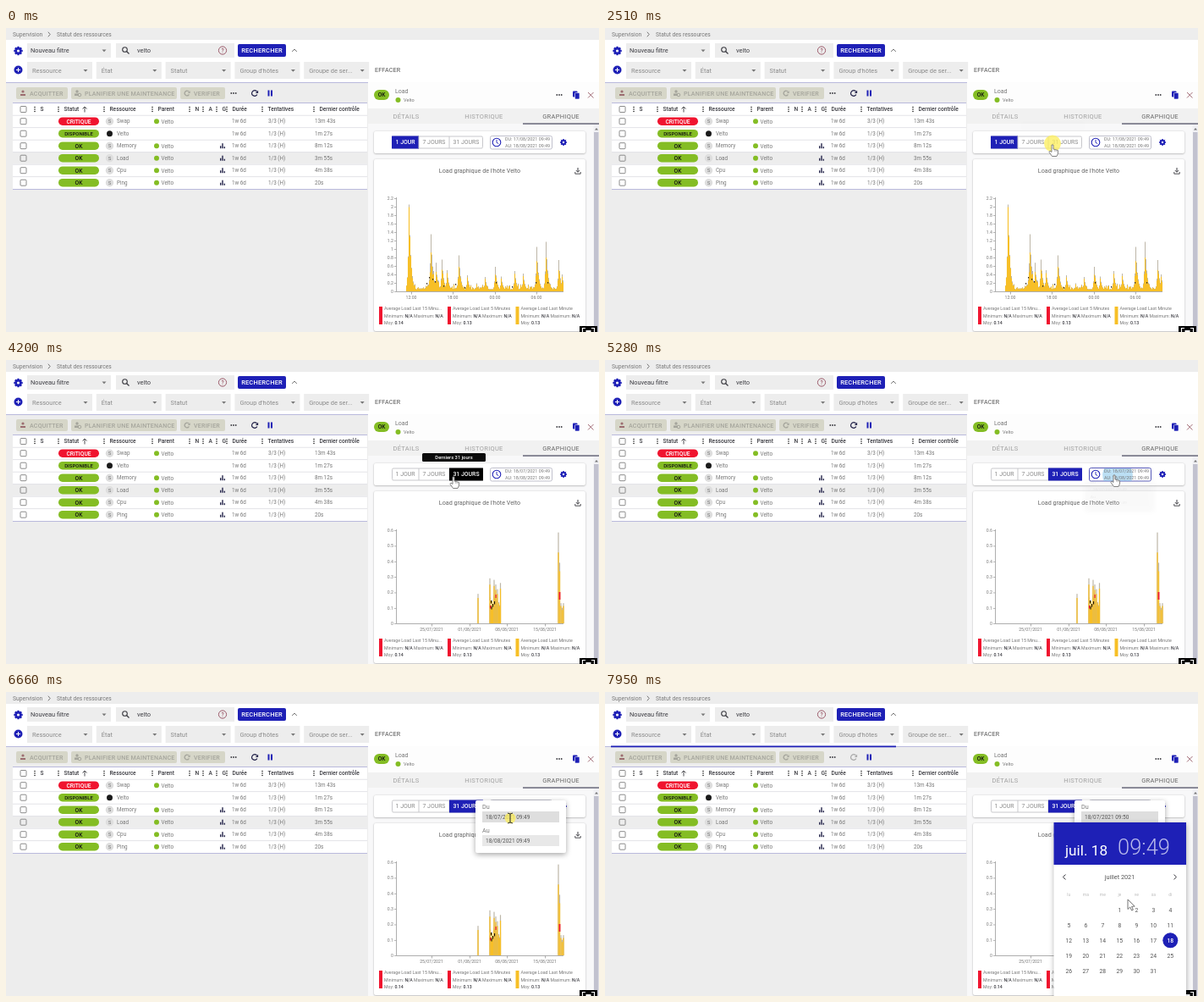
Recreate the animation shown at these times as an HTML page with a canvas. Size 701x359 px, loop 8000 ms.

```html
<!DOCTYPE html>
<html lang="fr">
<head>
<meta charset="utf-8">
<title>Statut des ressources</title>
<style>
html, body { margin: 0; width: 100%; height: 100%; overflow: hidden; background: #ededed; }
canvas { display: block; width: 701px; height: 359px; }
</style>
</head>
<body>
<canvas id="stage" width="701" height="359"></canvas>
<script>
const c = document.getElementById('stage').getContext('2d');
const LOOP = 8000;
const HOST = 'Velto';
const BLUE = '#1e20b6', GREEN = '#84bd24', RED = '#f0142f', YELLOW = '#f7bf27';
const INK = '#3a3a40', GREY = '#777', SOFT = '#8a8a8a', PALE = '#ededed', NAVY = '#24244a';

const clamp = v => Math.max(0, Math.min(1, v));
const ramp = (t, a, b) => clamp((t - a) / (b - a));
const smooth = v => v * v * (3 - 2 * v);
const noise = n => { const s = Math.sin(n * 127.1 + 3.7) * 43758.5453; return s - Math.floor(s); };

function rect(x, y, w, h, fill) { c.fillStyle = fill; c.fillRect(x, y, w, h); }

function box(x, y, w, h, r, fill, stroke, line = 1) {
  c.beginPath();
  c.roundRect(x, y, w, h, r);
  if (fill) { c.fillStyle = fill; c.fill(); }
  if (stroke) { c.strokeStyle = stroke; c.lineWidth = line; c.stroke(); }
}

function dot(x, y, r, fill) {
  c.beginPath();
  c.arc(x, y, r, 0, 7);
  c.fillStyle = fill;
  c.fill();
}

function ring(x, y, r, color, line = 1, from = 0, to = Math.PI * 2) {
  c.beginPath();
  c.arc(x, y, r, from, to);
  c.strokeStyle = color;
  c.lineWidth = line;
  c.stroke();
}

function path(points, color, line = 1, fill) {
  c.beginPath();
  points.forEach(([x, y], i) => i ? c.lineTo(x, y) : c.moveTo(x, y));
  if (fill) { c.closePath(); c.fillStyle = fill; c.fill(); }
  if (color) { c.strokeStyle = color; c.lineWidth = line; c.stroke(); }
}

// y is the middle of the capital letters; returns the width
function text(s, x, y, size, color = INK, { weight = 400, align = 'left', space = 0 } = {}) {
  c.font = `${weight} ${size}px Roboto, Arial, sans-serif`;
  c.letterSpacing = space + 'px';
  c.textAlign = align;
  c.fillStyle = color;
  c.fillText(s, x, y + size * 0.36);
  return c.measureText(s).width;
}

function shadowed(draw, blur = 6, drop = 2) {
  c.save();
  c.shadowColor = 'rgba(0,0,0,.35)';
  c.shadowBlur = blur;
  c.shadowOffsetY = drop;
  draw();
  c.restore();
}

function gear(x, y, r) {
  c.save();
  c.translate(x, y);
  for (let i = 0; i < 8; i++) {
    c.rotate(Math.PI / 4);
    rect(-r * 0.22, -r, r * 0.44, r, BLUE);
  }
  c.restore();
  ring(x, y, r * 0.55, BLUE, r * 0.5);
  dot(x, y, r * 0.3, '#fff');
}

function dots(x, y, dx, dy, r, color) {
  for (const k of [-1, 0, 1]) dot(x + k * dx, y + k * dy, r, color);
}

function chevron(x, y, dx, dy, color = GREY) {
  path(dx ? [[x - dx, y - 2.8], [x + dx, y], [x - dx, y + 2.8]]
          : [[x - 2.8, y + dy], [x, y - dy], [x + 2.8, y + dy]], color, 1);
}

function reload(x, y, r, color) {
  ring(x, y, r, color, 1.2, 0.5, 5.6);
  path([[x + r + 0.8, y - r], [x + r + 0.8, y], [x + 0.8, y]], null, 0, color);
}

function select(label, x, y, w, h, color = SOFT, inset = 6) {
  rect(x, y, w, h, PALE);
  text(label, x + inset, y + h / 2, 7.4, color);
  const mx = x + w - 8, my = y + h / 2;
  path([[mx - 2.5, my - 1], [mx + 2.5, my - 1], [mx, my + 1.8]], null, 0, GREY);
}

function filters() {
  rect(0, 0, 701, 359, PALE);
  text('Supervision', 8, 7.5, 6.8, GREY);
  chevron(51, 7.5, 1.2, 0);
  text('Statut des ressources', 60, 7.5, 6.7, GREY);

  rect(0, 14, 701, 50, '#fff');
  gear(14.5, 27, 5.2);
  select('Nouveau filtre', 25, 18, 99, 17, INK, 4);
  rect(130, 18, 140, 17, PALE);
  ring(140.5, 25.5, 2.8, INK, 1.1);
  path([[142.5, 27.5], [145.5, 30.5]], INK, 1.3);
  text(HOST.toLowerCase(), 155, 26.5, 7.5);
  ring(256, 26.5, 4.6, '#9c5a6a', 1);
  text('?', 256, 26.7, 6.5, '#9c5a6a', { weight: 500, align: 'center' });
  box(274, 19, 57, 15, 2, BLUE);
  text('RECHERCHER', 302.5, 26.7, 7.5, '#fff', { weight: 500, align: 'center', space: 0.15 });
  chevron(341, 26.5, 0, 1.5, GREY);

  dot(14.5, 49.5, 5, BLUE);
  rect(12, 49, 5, 1, '#fff');
  rect(14, 47, 1, 5, '#fff');
  ['Ressource', 'État', 'Statut', "Group d'hôtes", 'Groupe de ser...']
    .forEach((s, i) => select(s, 25 + i * 81.8, 40, 77, 20));
  text('EFFACER', 436, 49.5, 7.1, '#555', { space: 0.2 });
}

function toolbar(t) {
  rect(0, 64, 428, 1, '#b9b9dc');
  const bar = ramp(t, 7500, 7950);
  if (bar) rect(7, 63.5, 337 * bar, 1.8, BLUE);
  const off = '#a5a59c';
  for (const [x, w, s] of [[12, 61, 'ACQUITTER'], [77, 125, 'PLANIFIER UNE MAINTENANCE'], [206, 53, 'VERIFIER']]) {
    box(x, 70, w, 14, 2, '#d6d6c8');
    text(s, x + 16, 77.2, 7.1, off, { weight: 500, space: 0.2 });
  }
  dot(20, 75, 1.6, '#9c6d70');
  rect(17, 78, 6, 2, '#9c6d70');
  dot(84, 75, 1.7, off);
  rect(81, 77.5, 5, 2.5, off);
  ring(87, 79, 1.8, off);
  reload(214, 77, 2.8, off);
  dots(269, 77, 2.7, 0, 0.9, INK);
  reload(294, 77, 3.3, t >= 7500 ? '#aaa' : NAVY);
  rect(309.5, 73.5, 2, 7, BLUE);
  rect(313, 73.5, 2, 7, BLUE);
}

const COLS = [[34, 'S'], [62, 'Statut'], [116, 'Ressource'], [173, 'Parent'], [217, 'N'],
  [233, 'A'], [249, 'G'], [261, 'Durée'], [303, 'Tentatives'], [364, 'Dernier contrôle']];
const ROWS = [['CRITIQUE', 'Swap', '3/3 (H)', '13m 43s'], ['DISPONIBLE', HOST, '1/3 (H)', '1m 27s'],
  ['OK', 'Memory', '1/3 (H)', '8m 12s'], ['OK', 'Load', '1/3 (H)', '3m 55s'],
  ['OK', 'Cpu', '1/3 (H)', '4m 38s'], ['OK', 'Ping', '1/3 (H)', '20s']];

function checkbox(y) { box(17, y - 3.5, 7, 7, 1, null, SOFT, 1); }

function table() {
  rect(8, 88, 419, 102, '#fff');
  rect(8, 88, 419, 1, '#b9b9dc');
  checkbox(96);
  for (const [x, s] of COLS) {
    dots(x, 96, 0, 2.5, 0.8, '#222');
    text(s, x + 6.5, 96, 6.6, INK, { weight: 500 });
  }
  path([[93, 99.5], [93, 93]], INK, 0.9);
  path([[90.5, 95.5], [93, 93], [95.5, 95.5]], INK, 0.9);

  ROWS.forEach(([status, name, tries, last], i) => {
    const y = 110.2 + i * 14.5;
    if (i === 3) rect(8, y - 7, 419, 14, PALE);
    rect(8, y - 7.4, 419, 0.8, '#dcdce2');
    checkbox(y);
    box(62, y - 4.8, 48, 9.6, 4.8, i ? GREEN : RED);
    text(status, 86, y, i === 1 ? 6 : 6.7, i ? '#111' : '#fff', { weight: 500, align: 'center' });
    if (i === 1) {
      dot(122.5, y, 3.5, '#1a1a1a');
    } else {
      dot(122.5, y, 4.7, '#dedede');
      text('S', 122.5, y, 6, GREY, { align: 'center' });
      dot(178, y, 3, GREEN);
      text(HOST, 183.5, y, 6.4, GREY);
    }
    if (i > 1) [3, 6, 2].forEach((h, k) => rect(253 + k * 2.3, y + 3 - h, 1.4, h, NAVY));
    text(name, 131, y, 6.3, GREY);
    text('1w 6d', 267, y, 6.3, GREY);
    text(tries, 310, y, 6.3, GREY);
    text(last, 365, y, 6.3, GREY);
  });
  rect(8, 190, 419, 1, '#b9b9dc');
}

function panel() {
  rect(428, 64, 273, 295, '#f8f8f9');
  rect(428, 64, 273, 31, '#fdfdfd');
  rect(428, 95, 273, 18, '#f1f1f1');
  box(435, 73, 18, 12, 6, GREEN);
  text('OK', 444, 79, 6.5, '#111', { weight: 500, align: 'center' });
  text('Load', 460, 74.5, 7, GREY);
  dot(463.5, 85, 3, GREEN);
  text(HOST, 470, 85, 5.6, GREY);
  dots(654, 79, 2.7, 0, 0.9, INK);
  box(670, 74.5, 5.5, 7, 1, BLUE);
  box(672.5, 76.5, 5.5, 7.5, 1, BLUE, '#fdfdfd', 0.6);
  path([[688, 76], [694.5, 82.5]], '#985d68', 0.9);
  path([[694.5, 76], [688, 82.5]], '#985d68', 0.9);
  const tab = { align: 'center', space: 0.3 };
  text('DÉTAILS', 473, 104, 7.5, '#a0a0a0', tab);
  text('HISTORIQUE', 565, 104, 7.5, '#a0a0a0', tab);
  text('GRAPHIQUE', 656, 104, 7.5, '#666', tab);
  rect(611, 112.5, 90, 1.1, '#34344c');

  rect(694.5, 114, 6.5, 245, '#f0f0f4');
  rect(695, 123, 5.5, 236, '#c2c2cf');
  path([[696, 120.5], [700, 120.5], [698, 118]], null, 0, '#777');
  shadowed(() => box(435, 122, 250, 26, 2, '#fff'), 2, 0.4);
  shadowed(() => box(435, 155, 250, 203, 2, '#fff'), 2, 0.4);
}

function periods(t, pos) {
  const chosen = t < 2620 ? 0 : 2;
  const over = (x, w) => pos && pos.x >= x && pos.x < x + w && pos.y > 126 && pos.y < 143;
  box(456.5, 128, 107, 14, 1.5, '#fff', '#c8c8cc', 1);
  [[456, 32, '1 JOUR'], [488, 36, '7 JOURS'], [524, 40, '31 JOURS']].forEach(([x, w, s], i) => {
    const on = chosen === i;
    if (i) rect(x - 0.5, 128, 1, 14, '#c8c8cc');
    if (on) rect(x, 127.5, w, 15, over(x, w) ? '#000' : BLUE);
    text(s, x + w / 2, 135, 6.9, on ? '#fff' : SOFT, { align: 'center', weight: on ? 500 : 400 });
  });

  const day = chosen ? '18/07/2021' : '17/08/2021';
  box(572.5, 127.5, 73, 15.5, 2, '#fff', over(572, 74) ? '#5558b8' : '#c0c0cc', 1);
  const wave = ramp(t, 5150, 5350);
  if (wave && t < 5600) {
    c.save();
    c.beginPath();
    c.rect(573, 128, 72, 15);
    c.clip();
    dot(606, 136, 22 * Math.sqrt(wave), 'rgba(105,185,230,.45)');
    c.restore();
  }
  ring(580, 135, 4.8, BLUE, 1.1);
  path([[580, 132], [580, 135.3], [582.3, 136.6]], BLUE, 0.9);
  text(`DU: ${day} 09:49`, 590, 131, 5.4, GREY);
  text('AU: 18/08/2021 09:49', 590, 138.8, 5.4, GREY);
  gear(659, 135, 3.9);
}

function axes(top, step, unit, ticks) {
  path([[461.5, 200], [461.5, 311.5], [659, 311.5]], '#9a9a9a', 0.8);
  for (let i = 0; i * step <= top + 0.01; i++) {
    const y = 311.3 - i * step * unit;
    rect(459, y, 2.5, 0.7, '#999');
    text(String(+(i * step).toFixed(1)), 458, y, 5.2, GREY, { align: 'right' });
  }
  for (const [x, s] of ticks) {
    rect(x, 311.5, 0.8, 3, '#999');
    text(s, x, 318.5, 5.2, GREY, { align: 'center' });
  }
}

function spike(x, value, unit, width, share) {
  const h = value * unit;
  rect(x - width * 0.5, 311 - h, width, h, '#bdb6a8');
  rect(x - width * 0.55, 311 - h * share, width * 1.1, h * share, YELLOW);
}

const PEAKS = [[476, 2.05], [502, 1.3], [508, 0.6], [515, 0.75], [521, 0.5], [535, 0.85], [545, 0.38],
  [566, 0.34], [578, 0.58], [585, 0.35], [601, 0.48], [611, 0.42], [627, 1.05], [638, 1.17], [653, 0.74], [657, 0.4]];

function dayChart() {
  axes(2.2, 0.2, 50, [[479, '12:00'], [528, '18:00'], [578, '00:00'], [627, '06:00']]);
  for (let x = 473; x < 659; x++) {
    let v = 0.05 + 0.16 * noise(x) * noise(x * 0.37);
    for (const [p, h] of PEAKS) v = Math.max(v, h * Math.exp(-Math.abs(x - p) / (x < p ? 1.1 : 2.3)));
    if (x > 496 && x < 512) v += 0.14 * noise(x + 9);
    spike(x + 0.5, v, 50, 1, x < 480 ? 0.97 : v > 0.5 ? 0.68 : 0.86);
  }
  for (const [x, y] of [[497, 301], [500, 294], [504, 296], [507, 299], [517, 304], [531, 302], [542, 306],
    [579, 300], [598, 305], [626, 300], [640, 300]]) rect(x, y, 1.2, 1.6, '#302820');
}

function monthChart() {
  axes(0.6, 0.1, 183.5, [[503, '25/07/2021'], [548, '01/08/2021'], [592, '08/08/2021'], [637, '15/08/2021']]);
  const unit = 183.5;
  for (let x = 572; x < 585; x++) spike(x + 0.5, 0.11 + 0.09 * noise(x), unit, 1, 0.94);
  for (const [x, v] of [[558, 0.19], [572, 0.29], [577, 0.28], [579, 0.25], [581, 0.22], [584.5, 0.26],
    [653, 0.585], [654.5, 0.39], [656, 0.13], [657.5, 0.1], [659, 0.13]]) {
    spike(x, v, unit, 1.2, v > 0.5 ? 0.78 : 0.86);
  }
  rect(572, 290, 1.4, 3.5, RED);
  rect(578.5, 277, 1.2, 4, RED);
  rect(653.6, 274, 1.8, 9, RED);
  for (const [x, y] of [[573, 284], [575, 288], [577, 285], [573.5, 291]]) rect(x, y, 1.1, 3.5, '#1c1810');
}

function pairs(x, y, ...items) {
  for (const [label, value] of items) {
    x += text(label + ': ', x, y, 5.2, GREY);
    x += text(value + ' ', x, y, 5.2, INK, { weight: 500 });
  }
}

function graph(t) {
  text("Load graphique de l'hôte " + HOST, 560, 168.5, 7.2, '#666', { align: 'center' });
  path([[676, 165], [676, 170]], INK, 1);
  path([[673.8, 168], [676, 170.3], [678.2, 168]], INK, 0.9);
  path([[672.8, 170], [672.8, 172.2], [679.2, 172.2], [679.2, 170]], INK, 0.9);
  if (t < 3100) dayChart(); else monthChart();
  [[441, RED, '15 Minu...', '0.14'], [522, RED, '5 Minutes', '0.13'], [602.5, YELLOW, 'Minute', '0.13']]
    .forEach(([x, color, span, mean]) => {
      rect(x, 329, 4, 21, color);
      text('Average Load Last ' + span, x + 6, 331.5, 5.3, GREY);
      pairs(x + 6, 340, ['Minimum', 'N/A'], ['Maximum', 'N/A']);
      pairs(x + 6, 348, ['Moy', mean]);
    });
}

function corner() {
  rect(678, 352, 21, 7, '#000');
  path([[681.5, 359], [681.5, 354.5], [685, 354.5]], '#fff', 1.2);
  path([[692, 354.5], [695.5, 354.5], [695.5, 359]], '#fff', 1.2);
  rect(685.5, 357, 6, 2, '#fff');
}

function tooltip(t) {
  const a = ramp(t, 2510, 2750) * (1 - ramp(t, 4680, 4850));
  if (!a) return;
  c.globalAlpha = a;
  box(492, 110, 75, 10, 1.5, '#0c0c0c');
  text('Derniers 31 jours', 529.5, 115, 5.8, '#fff', { weight: 500, align: 'center' });
  c.globalAlpha = 1;
}

function grow(p, x, y, draw) {
  if (!p) return;
  const s = smooth(p);
  c.save();
  c.globalAlpha = s;
  c.translate(x, y);
  c.scale(0.75 + 0.25 * s, 0.56 + 0.44 * s);
  c.translate(-x, -y);
  draw();
  c.restore();
}

function rangePopup(t) {
  grow(ramp(t, 5240, 5480), 608, 159, () => {
    shadowed(() => box(555, 128, 107, 62, 2, '#fff'));
    text('Du', 563, 135.3, 7.2, GREY);
    rect(563, 141, 91, 13, t > 6000 ? '#dedede' : '#e8e8e8');
    text(t < 7500 ? '18/07/2021 09:49' : '18/07/2021 09:50', 567, 147.8, 6.5, '#555');
    text('Au', 563, 163.3, 7.2, GREY);
    rect(563, 169, 91, 13, '#e8e8e8');
    text('18/08/2021 09:49', 567, 175.8, 6.5, '#555');
  });
}

function calendar(t) {
  grow(ramp(t, 6690, 6960), 608, 260, () => {
    shadowed(() => rect(530.5, 154, 156.5, 220, '#fff'));
    rect(530.5, 154, 156.5, 50, BLUE);
    text('juil. 18', 544, 186.5, 17.2, '#fff');
    text('09:49', 606, 182.5, 25.5, '#b9baeb', { weight: 300 });
    text('juillet 2021', 608.5, 218, 7.3, '#555', { align: 'center' });
    path([[544.5, 215.5], [541.5, 218.5], [544.5, 221.5]], INK, 1);
    chevron(674, 218.5, 1.5, 0, INK);
    ['lu', 'ma', 'me', 'je', 've', 'sa', 'di'].forEach((s, i) =>
      text(s, 548.3 + i * 20, 239, 5, '#bbb', { align: 'center' }));
    for (let d = 1; d <= 31; d++) {
      const k = d + 2, x = 548.3 + (k % 7) * 20, y = 257.3 + Math.floor(k / 7) * 18;
      if (d === 18) dot(x, y, 9, BLUE);
      text(String(d), x, y, 6.8, d === 18 ? '#fff' : '#555', { align: 'center', weight: d === 18 ? 500 : 400 });
    }
  });
}

// time, hot spot x, hot spot y, shape from then on
const TRACK = [[800, 703, 358, 'arrow'], [1200, 630, 212, 'arrow'], [1300, 607, 176, 'beam'],
  [1350, 602, 169, 'beam'], [1420, 588, 145, 'hand'], [1550, 549, 137, 'hand'], [1620, 546, 138, 'hand'],
  [1820, 514, 152, 'arrow'], [2000, 494, 148, 'arrow'], [2120, 499, 139, 'hand'], [2370, 529, 138, 'hand'],
  [4600, 529, 138, 'hand'], [4900, 560, 138, 'hand'], [5250, 602, 136, 'hand'], [5680, 602, 136, 'arrow'],
  [6000, 614, 158, 'arrow'], [6220, 606, 153, 'beam'], [6460, 596, 149, 'beam'], [6800, 596, 149, 'beam'],
  [6960, 600, 168, 'arrow'], [7260, 613, 226, 'arrow'], [7460, 613, 226, 'arrow'], [7800, 618, 245, 'arrow'],
  [8000, 618, 245, 'arrow']];

function pointer(t) {
  if (t < TRACK[0][0]) return null;
  const i = TRACK.findIndex(k => k[0] > t);
  const [a, x, y, shape] = TRACK[i - 1], [b, x2, y2] = TRACK[i];
  const p = ramp(t, a, b);
  return { x: x + (x2 - x) * p, y: y + (y2 - y) * p, shape };
}

function drawPointer({ x, y, shape }) {
  c.save();
  c.translate(x, y);
  if (shape === 'beam') {
    path([[-3, -6], [0, -5], [3, -6]], '#333', 1);
    path([[0, -5], [0, 5]], '#333', 1.1);
    path([[-3, 6], [0, 5], [3, 6]], '#333', 1);
  } else if (shape === 'hand') {
    path([[-1, 0], [1, 0], [1, 5], [6.5, 6.5], [6.5, 10], [5, 13.5], [-0.5, 13.5], [-4, 8.5], [-3, 7], [-1, 8.5], [-1, 0]],
      '#777', 0.9, '#fff');
    path([[2.8, 6], [2.8, 8]], '#999', 0.7);
    path([[4.7, 6.5], [4.7, 8.3]], '#999', 0.7);
  } else {
    path([[0, 0], [0, 11.5], [2.7, 9], [4.6, 13], [6.4, 12.2], [4.6, 8.3], [8.2, 8.1], [0, 0]], '#666', 0.9, '#fff');
  }
  c.restore();
}

function clickGlow(t, start, x, y, r) {
  if (t < start || t > start + 230) return;
  const fade = 1 - ramp(t, start + 120, start + 230);
  dot(x, y, r, `rgba(252,238,95,${0.78 * fade})`);
}

function draw(t) {
  const pos = pointer(t);
  filters();
  toolbar(t);
  table();
  panel();
  periods(t, pos);
  graph(t);
  corner();
  tooltip(t);
  rangePopup(t);
  calendar(t);
  clickGlow(t, 2440, 529, 136.5, 10);
  clickGlow(t, 6590, 596, 149, 6.5);
  if (pos) drawPointer(pos);
}

const start = performance.now();
function frame(now) {
  draw(Math.max(0, now - start) % LOOP);
  requestAnimationFrame(frame);
}
draw(0);
requestAnimationFrame(frame);
</script>
</body>
</html>
```
